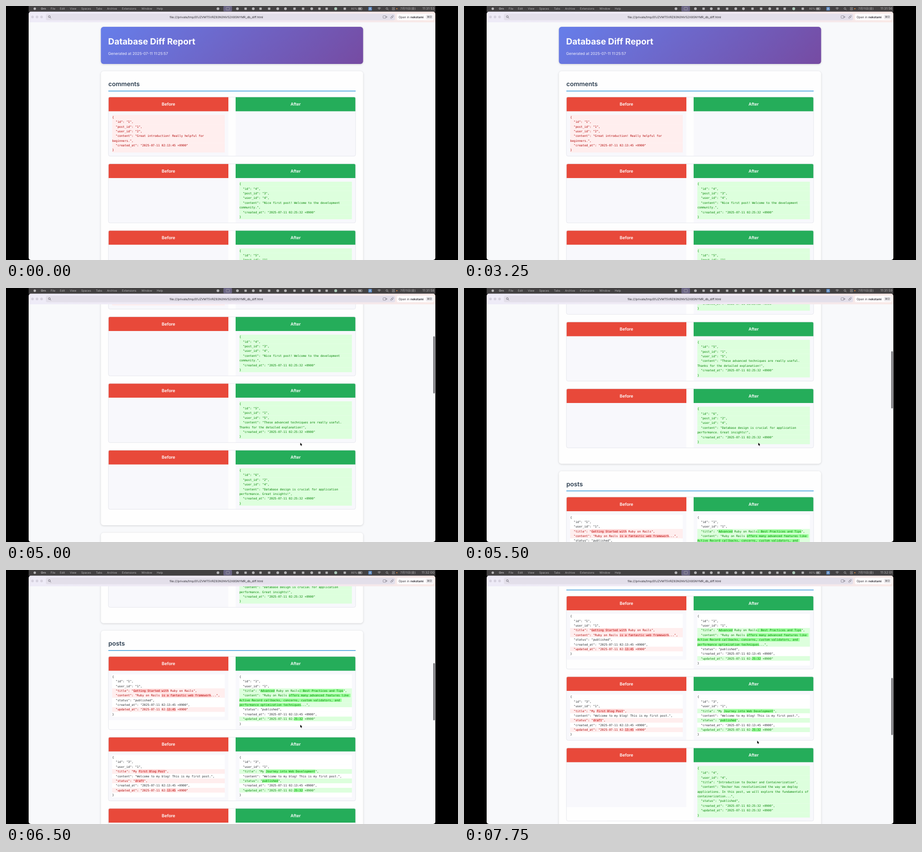
An HTML page with a canvas for the animation above (8 s loop, 998 px wide and 561 px high).

```html
<!DOCTYPE html>
<html lang="en">
<head>
<meta charset="utf-8">
<title>Database Diff Report</title>
<style>
html, body { margin: 0; width: 100%; height: 100%; overflow: hidden; background: #000; }
canvas { display: block; }
</style>
</head>
<body>
<canvas id="stage" width="998" height="561"></canvas>
<script>
const ctx = document.getElementById('stage').getContext('2d');
const SANS = 'Inter, "Noto Sans CJK JP", "Noto Sans CJK", sans-serif';
const MONO = '"DejaVu Sans Mono", monospace';
const LOOP = 8000, STEP = 250;
const LINE = 10.37, CHAR = 3.895, HEAD = 31.5, PAD = 8, EMPTY = 83.3, GAP = 16.6;
const PRE_W = 248.5;
const TONES = {
  '-': { back: '#ffeeee', ink: '#b00000', strong: '#ffcccc' },
  '+': { back: '#ddffdd', ink: '#008000', strong: '#99ff99' },
  ' ': { back: '#ffffff', ink: '#24282c' }
};

// First character of a row gives its tone, | breaks a line, [ ] marks strong text.
const stamp = (mark, name, value) => `${mark}  "${name}": "2025-07-11 02:${value} +0900"`;
const field = (mark, name, value) => `${mark}  "${name}": "${value}",`;
const wrap = (mark, rows) => [mark + '{', ...rows, mark + '}'];

const comment = (mark, id, post, user, content, time) => wrap(mark, [
  field(mark, 'id', id), field(mark, 'post_id', post), field(mark, 'user_id', user),
  field(mark, 'content', content), stamp(mark, 'created_at', time)
]);

const editedPost = (mark, id, title, content, status) => wrap(' ', [
  field(' ', 'id', id), field(' ', 'user_id', 1), field(mark, 'title', title),
  field(content.includes('[') ? mark : ' ', 'content', content),
  field(status.includes('[') ? mark : ' ', 'status', status),
  stamp(' ', 'created_at', '13:45') + ',',
  stamp(mark, 'updated_at', mark === '-' ? '[13:45]' : '[25:32]')
]);

const newPost = wrap('+', [
  field('+', 'id', 4), field('+', 'user_id', 4),
  field('+', 'title', 'Introduction to Docker and Containerization'),
  field('+', 'content', 'Docker has revolutionized the way we deploy|applications. In this post, we will explore the fundamentals of|containerization...'),
  field('+', 'status', 'published'),
  stamp('+', 'created_at', '25:32') + ',', stamp('+', 'updated_at', '25:32')
]);

const sections = [
  { title: 'comments', top: 144, height: 665, cards: [
    [comment('-', 1, 1, 2, 'Great introduction! Really helpful for|beginners.', '13:45'), null],
    [null, comment('+', 4, 3, 4, 'Nice first post! Welcome to the development|community.', '25:32')],
    [null, comment('+', 5, 1, 5, 'These advanced techniques are really useful.|Thanks for the detailed explanation!', '25:32')],
    [null, comment('+', 6, 2, 4, 'Database design is crucial for application|performance. Great insights!', '25:32')]
  ] },
  { title: 'posts', top: 825.4, height: 700, cards: [
    [editedPost('-', 1, '[Getting Started with] Ruby on Rails',
      'Ruby on Rails [is a fantastic web framework]...', 'published'),
     editedPost('+', 1, '[Advanced] Ruby on Rails[: Best Practices and Tips]',
      'Ruby on Rails [offers many advanced features like |Active Record callbacks, concerns, custom validators, and |performance optimization techniques]...', 'published')],
    [editedPost('-', 3, 'My [First Blog Post]', 'Welcome to my blog! This is my first post.', '[draft]'),
     editedPost('+', 3, 'My [Journey into Web Development]', 'Welcome to my blog! This is my first post.', '[published]')],
    [null, newPost]
  ] }
];

function rect(x, y, w, h, fill, radius = 0) {
  ctx.fillStyle = fill;
  ctx.beginPath();
  ctx.roundRect(x, y, w, h, radius);
  ctx.fill();
}

function outline(x, y, w, h, color, radius = 0, width = 0.7) {
  ctx.strokeStyle = color;
  ctx.lineWidth = width;
  ctx.beginPath();
  ctx.roundRect(x, y, w, h, radius);
  ctx.stroke();
}

function round(x, y, r, from = 0, to = Math.PI * 2) {
  ctx.beginPath();
  ctx.ellipse(x, y, r, r, 0, from, to);
}

function dot(x, y, r, fill) {
  ctx.fillStyle = fill;
  round(x, y, r);
  ctx.fill();
}

function lines(color, width, ...paths) {
  ctx.strokeStyle = color;
  ctx.lineWidth = width;
  ctx.beginPath();
  for (const path of paths) path.forEach(([x, y], i) => i ? ctx.lineTo(x, y) : ctx.moveTo(x, y));
  ctx.stroke();
}

function text(str, x, y, size, color, weight = 400, align = 'left', family = SANS) {
  ctx.font = `${weight} ${size}px ${family}`;
  ctx.fillStyle = color;
  ctx.textAlign = align;
  ctx.fillText(str, x, y);
}

function panel(x, y, w, h, fill) {
  ctx.save();
  ctx.shadowColor = 'rgba(0,0,0,0.16)';
  ctx.shadowBlur = 4;
  ctx.shadowOffsetY = 1;
  rect(x, y, w, h, fill, 6);
  ctx.restore();
}

const lineCount = rows => rows.join('|').split('|').length;
const bodyHeight = rows => (rows ? lineCount(rows) * LINE : EMPTY) + PAD * 2;

function drawRows(rows, x, y) {
  for (const row of rows) {
    const tone = TONES[row[0]];
    let strong = false;
    for (const part of row.slice(1).split('|')) {
      rect(x, y, PRE_W, LINE + 0.1, tone.back);
      let col = 0;
      for (const piece of part.split(/([\[\]])/)) {
        if (piece === '[' || piece === ']') { strong = piece === '['; continue; }
        if (strong && piece) rect(x + col * CHAR, y + 1.3, piece.length * CHAR, 7.7, tone.strong);
        col += piece.length;
      }
      text(part.replace(/[\[\]]/g, ''), x, y + 7.4, 6.47, tone.ink, 400, 'left', MONO);
      y += LINE;
    }
  }
}

function drawCard(sides, y) {
  const height = HEAD + Math.max(...sides.map(bodyHeight));
  ctx.save();
  ctx.beginPath();
  ctx.roundRect(226, y, 546, height, 3.5);
  ctx.clip();
  rect(226, y, 546, height, '#fefefe');
  sides.forEach((rows, i) => {
    const x = i ? 507 : 226.3;
    rect(x, y, 264.7, HEAD + bodyHeight(rows), '#f8f8fc');
    rect(x, y, 264.7, HEAD, i ? '#25ad5a' : '#e8493a');
    text(i ? 'After' : 'Before', x + 132.4, y + 19.2, 9.35, '#fff', 600, 'center');
    if (rows) drawRows(rows, x + 8.2, y + HEAD + PAD);
  });
  ctx.restore();
  outline(226.2, y + 0.2, 545.6, height - 0.4, '#dcdde6', 3.5);
  return height;
}

function drawPage(scroll) {
  ctx.save();
  ctx.beginPath();
  ctx.rect(50, 36, 898, 525);
  ctx.clip();
  rect(50, 36, 898, 525, '#f8f9fb');
  ctx.translate(0, -scroll);

  // A 135 degree gradient fitted to the banner's corners.
  const reach = (579 + 82) / 4;
  const banner = ctx.createLinearGradient(499 - reach, 87 - reach, 499 + reach, 87 + reach);
  banner.addColorStop(0, '#667eea');
  banner.addColorStop(1, '#764ba2');
  panel(209.5, 46, 579, 82, banner);
  text('Database Diff Report', 225.5, 85, 19, '#fff', 700);
  text('Generated at 2025-07-11 11:25:57', 225.5, 108, 8.4, '#f0effb');

  for (const { title, top, height, cards } of sections) {
    panel(209.5, top, 579, height, '#fefefe');
    text(title, 226, top + 33, 13.6, '#2c3e50', 600);
    rect(226, top + 43, 546, 1.5, '#3498db');
    let y = top + 57;
    for (const card of cards) y += drawCard(card, y) + GAP;
  }
  ctx.restore();
}

function drawMenuBar(clock) {
  const ink = '#b4b3b5';
  rect(50, 0, 898, 13, '#434142');
  dot(63.5, 6, 2.7, ink);
  const menu = { Orn: 77, File: 98.5, Edit: 119, View: 141, Spaces: 166, Tabs: 198.5,
    Archive: 223, Extensions: 256, Window: 299, Help: 333 };
  for (const name in menu) text(name, menu[name], 8.2, 6.2, ink, name === 'Orn' ? 700 : 400);

  rect(480, 0, 19, 12, '#6b6584', 2);
  outline(486, 3.2, 7.5, 5.5, ink, 1);
  for (const x of [468, 511, 546, 600, 617, 675]) dot(x, 6, 3, ink);
  for (const x of [529, 562, 581, 637, 656, 692, 708, 748]) rect(x - 2.6, 3.4, 5.2, 5.2, ink, 0.8);
  dot(728, 6, 3.2, '#a9c6b5');
  text('80%', 762, 8.2, 6, ink);
  outline(777.5, 3.5, 9, 5, ink, 1.3);
  rect(778.5, 4.5, 6, 3, ink, 0.5);
  rect(800, 2, 8, 8, '#5b86bd', 1.5);
  text('A', 804, 8.2, 6, '#e3e8f0', 500, 'center');
  ctx.strokeStyle = ink;
  ctx.lineWidth = 0.9;
  for (const r of [1.5, 3.2, 5]) {
    round(824, 8.5, r, Math.PI * 1.25, Math.PI * 1.75);
    ctx.stroke();
  }
  drawLens(841, 5.5, 2, ink);
  outline(852.5, 3.2, 6, 2, ink, 1);
  outline(852.5, 6.7, 6, 2, ink, 1);
  dot(863, 6, 1.2, '#e58a3c');
  text('7月11日(金)', 870.5, 8.4, 6.7, ink);
  text(clock, 946, 8.4, 7.3, ink, 400, 'right');
}

function drawLens(x, y, r, color) {
  ctx.strokeStyle = color;
  ctx.lineWidth = 0.8;
  round(x, y, r);
  ctx.moveTo(x + r * 0.7, y + r * 0.7);
  ctx.lineTo(x + r * 1.8, y + r * 1.8);
  ctx.stroke();
}

function drawToolbar() {
  const shade = ctx.createLinearGradient(50, 0, 948, 0);
  shade.addColorStop(0, '#eeebf7');
  shade.addColorStop(0.6, '#f0e9f3');
  shade.addColorStop(1, '#f9e9e6');
  rect(50, 12.5, 898, 23.5, shade, [5, 5, 0, 0]);
  for (const x of [58.5, 68.5, 78.5]) dot(x, 24.2, 2.9, '#d6d2df');
  rect(88, 17, 771, 14.5, '#e3dfea', 3.5);
  drawLens(95.7, 23.5, 2.1, '#55535c');
  text('file:///private/tmp/01JZVMT5VRZ83N3NV52X8SNYMR_db_diff.html', 464.5, 26.5, 6.5, '#2b2930', 400, 'center');
  const ink = '#77737f';
  outline(832.5, 21.5, 6.5, 5.5, ink, 1);
  lines(ink, 0.8, [[837, 24.2], [841.5, 24.2]], [[840, 22.7], [841.5, 24.2], [840, 25.7]]);
  ctx.save();
  ctx.translate(852.3, 24.2);
  ctx.rotate(-Math.PI / 4);
  outline(-4, -1.5, 4.6, 3, ink, 1.5);
  outline(-0.6, -1.5, 4.6, 3, ink, 1.5);
  ctx.restore();
  rect(863, 17, 81.5, 14.5, '#fdfbfc', 3.5);
  text('Open in', 867, 26.5, 6.5, '#37353c');
  text('nekotami', 893, 26.5, 6.5, '#27252c', 600);
  rect(927.5, 19.5, 14.5, 9.5, '#e9e7ea', 2);
  text('⌘O', 934.7, 26.4, 5.9, '#4a484e', 400, 'center');
}

function drawCursor(x, y) {
  const shape = new Path2D('M0 0V6.2L1.4 4.9L2.4 7.2L3.5 6.7L2.5 4.5H4.4Z');
  ctx.save();
  ctx.translate(x, y);
  ctx.lineWidth = 1;
  ctx.strokeStyle = '#fff';
  ctx.stroke(shape);
  ctx.fillStyle = '#000';
  ctx.fill(shape);
  ctx.restore();
}

const scrollKeys = [[3750, 0], [4000, 45], [4250, 128], [5000, 285], [6000, 559], [7000, 784], [7750, 825]];

function slope(i) {
  const [t, v] = scrollKeys[i];
  return (scrollKeys[i + 1][1] - v) / (scrollKeys[i + 1][0] - t);
}

function tangent(i) {
  if (i === 0 || i === scrollKeys.length - 1) return 0;
  const a = slope(i - 1), b = slope(i);
  return 2 * a * b / (a + b);
}

// Monotone cubic curve through the scroll keys.
function scrollAt(t) {
  if (t <= scrollKeys[0][0]) return 0;
  const i = scrollKeys.findIndex(([time]) => time >= t) - 1;
  if (i < 0) return scrollKeys.at(-1)[1];
  const [t0, v0] = scrollKeys[i], [t1, v1] = scrollKeys[i + 1];
  const d = t1 - t0, u = (t - t0) / d, w = 1 - u;
  return v0 * (1 + 2 * u) * w * w + v1 * u * u * (3 - 2 * u)
    + d * (tangent(i) * u * w * w - tangent(i + 1) * u * u * w);
}

function clockAt(t) {
  const s = 11 * 3600 + 31 * 60 + 53 + Math.floor((t + 500) / 1000);
  return [s / 3600, s / 60 % 60, s % 60].map(n => String(Math.floor(n)).padStart(2, '0')).join(':');
}

function draw(t) {
  const scroll = scrollAt(t);
  rect(0, 0, 998, 561, '#000');
  ctx.save();
  ctx.beginPath();
  ctx.roundRect(50, 0, 898, 561, [0, 0, 5, 5]);
  ctx.clip();
  drawMenuBar(clockAt(t));
  drawPage(scroll);
  drawToolbar();
  if (scroll > 0) {
    rect(943.3, 37 + scroll * 0.2438, 3.8, 126.5, '#77777b', 1.9);
    const p = Math.min(1, Math.max(0, (t - 7000) / 750));
    const ease = p * p * (3 - 2 * p);
    drawCursor(649.8 - 2.4 * ease, 341.7 + 35.3 * ease);
  }
  ctx.restore();
}

ctx.textRendering = 'geometricPrecision';
const start = performance.now();
function frame() {
  const t = (performance.now() - start) % LOOP;
  draw(Math.floor(t / STEP) * STEP);
  requestAnimationFrame(frame);
}
draw(0);
requestAnimationFrame(frame);
</script>
</body>
</html>
```
